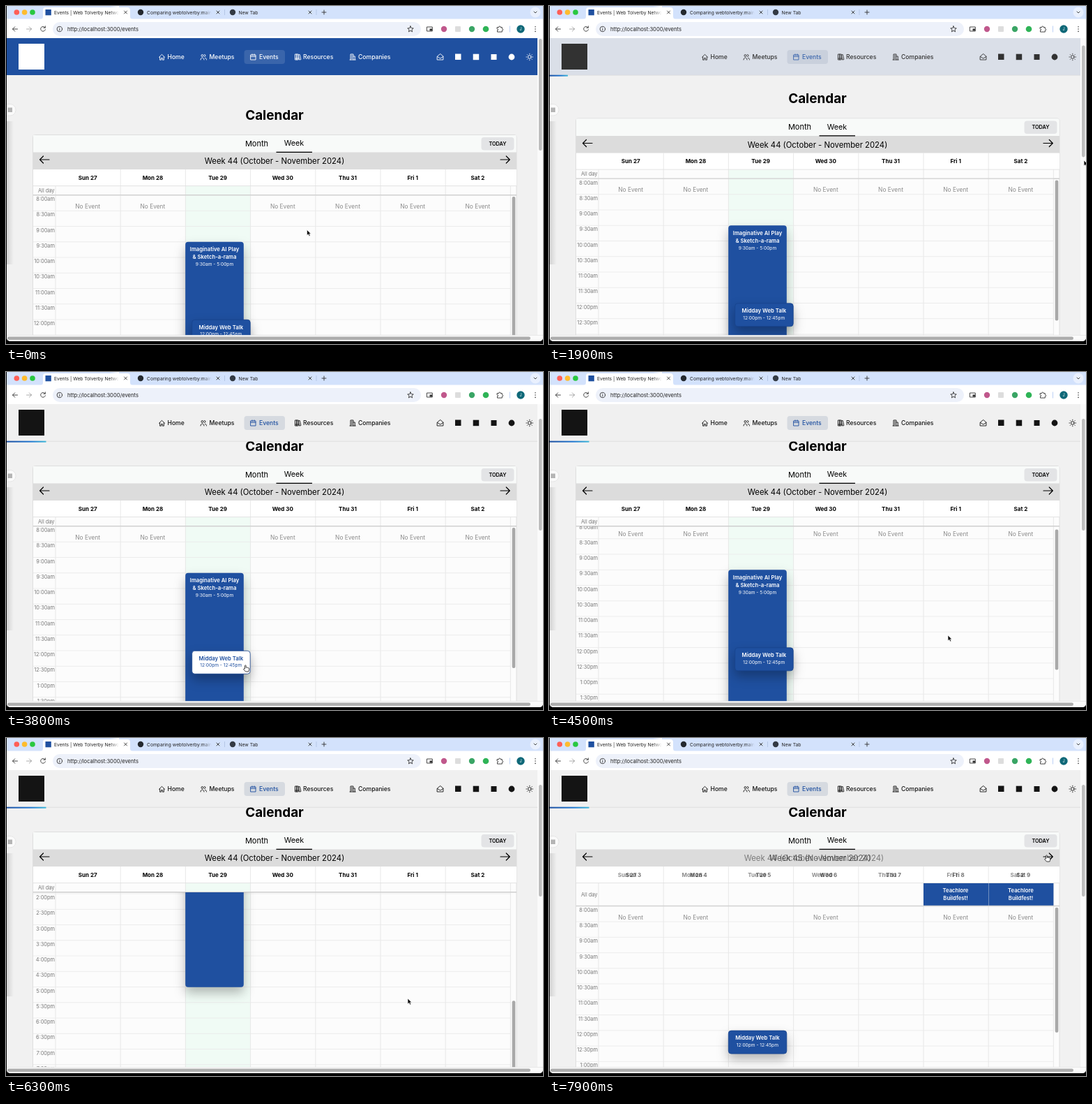
Recreate the animation shown at these times as an HTML page. Size 770 px wide and 484 px high, loop 8 s.

```html
<!DOCTYPE html>
<html lang="en">
<head>
<meta charset="utf-8">
<title>Week calendar</title>
<style>
  html, body { margin: 0; width: 100%; height: 100%; overflow: hidden; background: #000; }
  #stage { position: relative; width: 770px; height: 484px; overflow: hidden; background: #000; }
  #win { position: absolute; inset: 0; background: #f1f1f1; clip-path: inset(0 0 4px 1px round 0 0 5px 5px); }
  svg.layer { position: absolute; left: 0; top: 0; }
  text { font-family: Inter, "Open Sans", sans-serif; }
  .m { text-anchor: middle; }
  .e { text-anchor: end; }
  .b { font-weight: 700; }
  .sb { font-weight: 600; }
  .line { fill: none; stroke: currentColor; stroke-width: .9; stroke-linecap: round; stroke-linejoin: round; }
  .grey { fill: #777; font-size: 7.4px; }
  .none { fill: #8a8a8a; font-size: 8.4px; }
  .day { font-size: 8px; font-weight: 700; }
  .title { font-size: 11.3px; }
  .name { font-size: 7.7px; font-weight: 600; }
  .time { font-size: 6.6px; }
  .shade { filter: drop-shadow(0 8px 8px rgba(0, 0, 0, .28)); }
  .tab { font-size: 6.7px; fill: #222; }
  .nav { font-size: 8.6px; font-weight: 500; fill: currentColor; }
  #bar { position: absolute; left: 0; top: 46px; width: 762px; height: 53px; backdrop-filter: blur(5px); }
</style>
</head>
<body>
<div id="stage">
<div id="win">
  <svg class="layer" width="770" height="484">
    <defs>
      <linearGradient id="side"><stop offset="0" stop-color="#000" stop-opacity=".13"/><stop offset="1" stop-color="#000" stop-opacity="0"/></linearGradient>
      <linearGradient id="fadeW"><stop offset="0" stop-color="#fff" stop-opacity="0"/><stop offset="1" stop-color="#fff"/></linearGradient>
      <linearGradient id="fadeB"><stop offset="0" stop-color="#d3e2fc" stop-opacity="0"/><stop offset="1" stop-color="#d3e2fc"/></linearGradient>
      <linearGradient id="glow"><stop offset="0" stop-color="#1f50a0"/><stop offset=".6" stop-color="#2277d0"/><stop offset="1" stop-color="#40b8d8"/></linearGradient>
    </defs>
    <g id="page">
      <text class="m b" x="385" y="162.6" font-size="18.9">Calendar</text>
      <rect x="38.5" y="184.5" width="693.5" height="460" rx="3" fill="#fcfcfc" stroke="#dedede"/>
      <rect x="39" y="185" width="692.5" height="25" fill="#f8faf9"/>
      <text class="m" x="359.5" y="200.8" font-size="11">Month</text>
      <text class="m" x="413" y="200.4" font-size="10.8">Week</text>
      <rect x="681.5" y="188" width="47" height="18.5" rx="4" fill="#e3e4e6"/>
      <text class="m sb" x="705" y="199.9" font-size="7.3">TODAY</text>
      <rect x="39" y="209.5" width="693" height="24.7" fill="#dcdcdc"/>
      <rect x="387.5" y="208.7" width="51.5" height="1.3"/>
      <g id="titles"></g>
      <path class="line" style="stroke-width:1.2" d="M62 220H48.5m5-5l-5 5 5 5M709 220h13.300m-5-5l5 5-5 5"/>
      <rect x="39" y="234.200" width="693" height="23.500" fill="#fff"/>
      <g id="green" fill="#f0fbf5"><rect x="257.200" y="258" width="93.200" height="400"/></g>
      <g id="cols" stroke="#e3e3e3" stroke-width=".8"></g>
      <g id="days"></g>
      <path d="M39 257.600H732" stroke="#dcdcdc" stroke-width=".8"/>
      <text id="allDay" class="e grey" x="69.500" y="267">All day</text>
      <g id="banner" fill="#fff">
        <path d="M537 258h93v32.500h-93zM630.400 258h93v32.500h-93z" fill="#1f50a0"/>
        <text class="m name" x="583" y="271.200">Teachlore</text><text class="m name" x="583" y="282.200">Buildfest!</text>
        <text class="m name" x="676.500" y="271.200">Teachlore</text><text class="m name" x="676.500" y="282.200">Buildfest!</text>
      </g>
      <g id="body">
        <path d="M39 270.700H732" stroke="#cfcfcf" stroke-width="1.400"/>
        <svg y="271" width="770" height="360">
          <g id="rows">
            <g id="lines" stroke="#e9e9e9" stroke-width=".8"></g>
            <g id="hours"></g>
            <g id="empty"></g>
            <g id="long" fill="#fff">
              <rect class="shade" x="257.200" y="66.800" width="83.600" height="334" rx="4" fill="#1f50a0"/>
              <text class="m name" x="299" y="80.300">Imaginative AI Play</text>
              <text class="m name" x="299" y="91.300">&amp; Sketch-a-rama</text>
              <text class="m time" x="299" y="101.300">9:30am - 5:00pm</text>
            </g>
            <g id="chat">
              <rect class="shade" x="266.700" y="178.300" width="83.500" height="33" rx="4" stroke="#17438c" stroke-width=".8"/>
              <text class="m name" x="308.300" y="191.600">Midday Web Talk</text>
              <text class="m time" x="308.300" y="201.300">12:00pm - 12:45pm</text>
            </g>
          </g>
        </svg>
        <rect id="thumb" x="725.700" y="273" width="4.600" height="201" rx="2" fill="#a9a9a9"/>
      </g>
    </g>
    <rect x="1" y="165" width="10" height="205" fill="url(#side)"/>
    <rect x="-8" y="140.500" width="22" height="16.500" rx="8" fill="#fafafa" stroke="#dedede" stroke-width=".7"/>
    <rect x="2.500" y="145.500" width="6.500" height="6.500" fill="#b5b5b5"/>
  </svg>

  <div id="bar"></div>
  <svg id="head" class="layer" width="770" height="484">
    <path id="rule" d="M0 99.300H762" stroke="#d8d8d8" stroke-width=".7"/>
    <rect id="progress" y="98.700" height="2" fill="url(#glow)"/>
    <rect x="18" y="54" width="37" height="37" fill="currentColor"/>
    <rect id="pill" x="341.500" y="63" width="58.500" height="20" rx="4"/>
    <path class="line" d="M219.500 73.300l4-4 4 4M220.600 72.500v4.700h2v-2.700h1.800v2.700h2v-4.700"/>
    <path class="line" d="M279 77c0-4 5-4 5 0M285.500 74.500c1.600 0 2 1.300 2 2.500M283 71a1.500 1.500 0 1 1-3 0 1.500 1.500 0 1 1 3 0M284.500 69.500a1.500 1.500 0 0 1 0 3"/>
    <path class="line" d="M414.800 69h2.200v8h-2.200zM417 69h2.200v8H417zM419.500 70l1.700-.5 1.700 7-1.700.5zM414.800 75h4.400"/>
    <path class="line" d="M494 77V69h4v8M498 72h2.300v5M493 77h8.200M495.300 71h1.300M495.300 73h1.300M495.300 75h1.300"/>
    <text class="nav" x="231.500" y="76.200">Home</text>
    <text class="nav" x="291.500" y="76.200">Meetups</text>
    <text class="nav" x="426" y="76.200">Resources</text>
    <text class="nav" x="505" y="76.200">Companies</text>
    <g id="here">
      <path class="line" d="M351 70h7v7h-7zM351 72.300h7M353 68.800v2M356 68.800v2"/>
      <text class="nav" x="363" y="76.200">Events</text>
    </g>
    <path class="line" d="M618.500 72l4.200-3.500 4.200 3.500v5h-8.400zM618.500 72.500l4.200 2.500 4.200-2.500"/>
    <g fill="currentColor">
      <rect x="644" y="68.500" width="8.500" height="8.500"/><rect x="669.700" y="68.700" width="8.500" height="8.500"/>
      <rect x="695.500" y="69" width="8" height="8"/><circle cx="725" cy="73" r="4.400"/>
    </g>
    <circle class="line" cx="750.800" cy="73" r="2.300"/>
    <path class="line" d="M750.800 68.200v.8M750.800 77v.8M746 73h.8M754.800 73h.8M747.400 69.600l.6.600M753.600 75.800l.6.600M747.400 76.400l.6-.6M753.600 70.200l.6-.6"/>
  </svg>

  <svg class="layer" width="770" height="484">
    <rect x="762" y="46" width="8" height="426" fill="#fafafa"/>
    <rect id="pageThumb" x="764" y="47" width="4.600" height="160" rx="2.300" fill="#bdbdbd"/>
    <rect y="471.500" width="770" height="9" fill="#fafafa"/>
    <path d="M0 471.500H770" stroke="#e2e2e2" stroke-width=".7"/>
    <rect x="2" y="473.500" width="750" height="4.600" rx="2.300" fill="#adadad"/>
    <rect width="770" height="19" fill="#d3e2fc"/>
    <rect y="18.500" width="770" height="27.500" fill="#fff"/>
    <path d="M49 19q4 0 4-4V6q0-4 4-4H174q4 0 4 4v9q0 4 4 4z" fill="#fff"/>
    <circle cx="15.300" cy="9" r="3.800" fill="#ff5f57"/><circle cx="26.600" cy="9" r="3.800" fill="#febc2e"/><circle cx="38" cy="9" r="3.800" fill="#28c840"/>
    <rect x="56.500" y="5" width="8.300" height="8.300" fill="#1f50a0"/>
    <svg x="69" width="93" height="19"><text class="tab" y="11.500">Events | Web Tolverby Network</text><rect x="80" width="13" height="18" fill="url(#fadeW)"/></svg>
    <circle cx="193" cy="9" r="4.200" fill="#24292f"/>
    <svg x="202" width="93" height="19"><text class="tab" y="11.500">Comparing webtolverby:main</text><rect x="80" width="13" height="18" fill="url(#fadeB)"/></svg>
    <circle cx="325" cy="9" r="4.200" fill="#333a44"/>
    <text class="tab" x="333.500" y="11.500">New Tab</text>
    <path d="M313.500 5v8M445 5v8" stroke="#a9bddd" stroke-width=".7"/>
    <g color="#333">
      <path class="line" d="M169.500 7l4 4m0-4l-4 4M302 7l4 4m0-4l-4 4M434 7l4 4m0-4l-4 4M453 9h6m-3-3v6"/>
      <circle cx="759" cy="9" r="7.500" fill="#e9f0fe"/><path class="line" d="M757 8l2 2 2-2"/>
      <rect x="67" y="23" width="528" height="20" rx="10" fill="#edf1fa"/>
      <path class="line" d="M16.500 33H9.500m3.200-3.200L9.500 33l3.200 3.200M56 31a3.400 3.400 0 1 0 .4 2.800M56.300 28.800v2.400h-2.400"/>
      <path class="line" stroke-opacity=".45" d="M29.500 33h7m-3.200-3.200l3.200 3.200-3.200 3.200"/>
      <circle class="line" cx="76.800" cy="33" r="3.700"/><path class="line" d="M76.800 32.800v2M76.800 31.200v.1"/>
      <text x="88" y="35.800" font-size="7.600" fill="#222">http://localhost:3000/events</text>
      <path class="line" d="M580 28.800l1.200 2.800 3 .3-2.300 2 .7 3-2.600-1.600-2.600 1.600.7-3-2.300-2 3-.3z"/>
      <rect class="line" x="603.800" y="30" width="7.500" height="6"/><rect x="607.500" y="32.500" width="3.500" height="3" fill="#333"/>
      <circle cx="628" cy="33" r="4.200" fill="#c0588c"/>
      <rect x="644" y="29" width="8" height="8" rx="1" fill="#ddd"/>
      <circle cx="668" cy="33" r="4.200" fill="#3aa565"/><circle cx="688" cy="33" r="4.300" fill="#2fb457"/>
      <path class="line" d="M704.500 30.500h2.200c-.4-2 2.800-2 2.400 0h2.200v2.200c1.900-.3 1.900 2.500 0 2.200v2.200h-6.800v-2.300c1.700 0 1.700-2 0-2z"/>
      <path d="M722.500 28.500v9" stroke="#bcd0f5"/>
      <circle cx="738" cy="33" r="5.700" fill="#0f6878"/><text class="m" x="738" y="35" font-size="5.500" fill="#fff">J</text>
      <path d="M759 29.700v.1M759 33v.1M759 36.300v.1" class="line" style="stroke-width:1.500"/>
    </g>
  </svg>
</div>
<svg class="layer" width="770" height="484">
  <g id="cursor">
    <path id="arrow" d="M0 0v8l1.900-1.700L3.200 9l1.500-.7-1.300-2.600h2.400z" fill="#111" stroke="#fff" stroke-width=".6"/>
    <path id="hand" d="M-1.200 5V.4q.8-1.300 1.700 0V3.200q1-.6 1.600.2 1-.5 1.500.3 1.200-.2 1.300.8v2.200L4 9H-.2L-3.200 5.700q.3-1.400 2-.7z" fill="#fff" stroke="#111" stroke-width=".8"/>
  </g>
</svg>
</div>
<script>
const LOOP = 8000, ROW = 22.25, COL = 93.2, LEFT = 71, SWAP = 7750;
const NS = 'http://www.w3.org/2000/svg';
const $ = id => document.getElementById(id);

function add(parent, tag, attrs, text = '') {
  const el = document.createElementNS(NS, tag);
  for (const k in attrs) el.setAttribute(k, attrs[k]);
  el.textContent = text;
  parent.append(el);
  return el;
}
const center = i => LEFT + COL * (i + .5) - .4;

const weeks = [
  ['Week 44 (October - November 2024)', [27, 28, 29, 30, 31, 1, 2]],
  ['Week 45 (November 2024)', [3, 4, 5, 6, 7, 8, 9]]
].map(([title, dates]) => {
  const head = add($('titles'), 'g', {}), days = add($('days'), 'g', {});
  add(head, 'text', { class: 'm title', x: 385, y: 226.3 }, title);
  ['Sun', 'Mon', 'Tue', 'Wed', 'Thu', 'Fri', 'Sat'].forEach((d, i) =>
    add(days, 'text', { class: 'm day', x: center(i), y: 248.5 }, `${d} ${dates[i]}`));
  return [head, days];
});

for (let i = 0; i < 8; i++) {
  const x = LEFT + i * COL;
  add($('cols'), 'path', { d: `M${x} ${i % 7 ? 234 : 258}V650` });
}
for (let i = 0; i < 28; i++) {
  const h = 8 + (i >> 1);
  add($('lines'), 'path', { d: `M39 ${i * ROW}H723.5` });
  add($('hours'), 'text', { class: 'e grey', x: 70, y: i * ROW + 8.2 },
    `${h % 12 || 12}:${i % 2 ? '30' : '00'}${h < 12 ? 'am' : 'pm'}`);
}
const empty = [0, 1, 3, 4, 5, 6].map(i =>
  add($('empty'), 'text', { class: 'm none', x: center(i), y: 18.8 }, 'No Event'));

const clamp = v => Math.min(1, Math.max(0, v));
const smooth = v => v * v * (3 - 2 * v);
const mix = (a, b, p) => a.map((v, i) => v + (b[i] - v) * p);
const rgba = c => `rgba(${c.join()})`;
const move = (el, x, y) => el.setAttribute('transform', `translate(${x} ${y})`);

// Keys are [time, ...values]; eased between neighbours.
function track(keys, t) {
  let i = 0;
  while (i < keys.length - 2 && t >= keys[i + 1][0]) i++;
  const [t0, ...a] = keys[i], [t1, ...b] = keys[i + 1];
  return mix(a, b, smooth(clamp((t - t0) / (t1 - t0))));
}
const pointer = [[0, 431.5, 320.5], [1000, 442.5, 319.5], [1250, 442.5, 319.5], [1700, 767, 212],
  [1900, 767, 221], [2200, 767, 232], [2600, 767, 232], [3600, 343.7, 420], [4050, 343.7, 420],
  [4500, 572, 377], [5100, 573, 378.5], [5700, 576, 373], [6600, 576, 373], [7500, 713.8, 168], [8000, 713.8, 168]];
const inner = [[150, 0], [950, 79.5], [1100, 79.5], [1550, 0], [4450, 0], [5080, 240], [5200, 240],
  [5700, 265], [8000, 265]];
const outer = [[1700, 0], [1900, 23.5], [2250, 50]];

function draw(t) {
  const next = t >= SWAP;
  const [scroll] = track(outer, t);
  const down = next ? 0 : track(inner, t)[0];
  const shift = next ? 19.8 : 0;
  const [x, y] = track(pointer, t);

  move($('page'), 0, -scroll);
  move($('body'), 0, shift);
  move($('rows'), 0, -down);
  $('thumb').setAttribute('y', 273 + down * .578);
  $('thumb').setAttribute('height', next ? 179 : 201);
  $('pageThumb').setAttribute('y', 47 + scroll * .4);
  $('allDay').setAttribute('y', next ? 276.6 : 267);
  $('green').style.display = $('long').style.display = next ? 'none' : '';
  $('banner').style.display = next ? '' : 'none';
  empty[3].style.display = next ? 'none' : '';

  const p = clamp((t - SWAP) / 270);
  weeks.forEach((parts, k) => parts.forEach(el => {
    el.setAttribute('opacity', k ? p : 1 - p);
    move(el, k ? 9 * (1 - p) : -9 * p, 0);
  }));

  const top = 449.3 - scroll - down + shift;
  const overChat = !next && x > 266 && x < 350 && y > top && y < top + 33;
  const overNext = Math.abs(x - 715.5) < 9 && Math.abs(y - 170) < 9;
  const [box, ...labels] = $('chat').children;
  box.setAttribute('fill', overChat ? '#fff' : '#1f50a0');
  labels.forEach(el => el.setAttribute('fill', overChat ? '#1f50a0' : '#fff'));
  move($('chat'), next ? -9.4 : 0, 0);

  const h = clamp((t - 1700) / 230);
  $('bar').style.background = rgba(mix([31, 80, 160, 1], [240, 240, 240, .86], h));
  $('head').style.color = rgba(mix([255, 255, 255, 1], [20, 20, 20, 1], h));
  $('here').style.color = rgba(mix([255, 255, 255, 1], [31, 80, 160, 1], h));
  $('pill').style.fill = rgba(mix([255, 255, 255, .12], [110, 130, 160, .2], h));
  $('rule').setAttribute('opacity', h);
  $('progress').setAttribute('width', scroll * 1.15);

  move($('cursor'), x, y);
  const hand = overChat || overNext;
  $('hand').style.display = hand ? '' : 'none';
  $('arrow').style.display = hand ? 'none' : '';
}

const start = performance.now();
function tick() {
  draw((performance.now() - start) % LOOP);
  requestAnimationFrame(tick);
}
tick();
</script>
</body>
</html>
```
